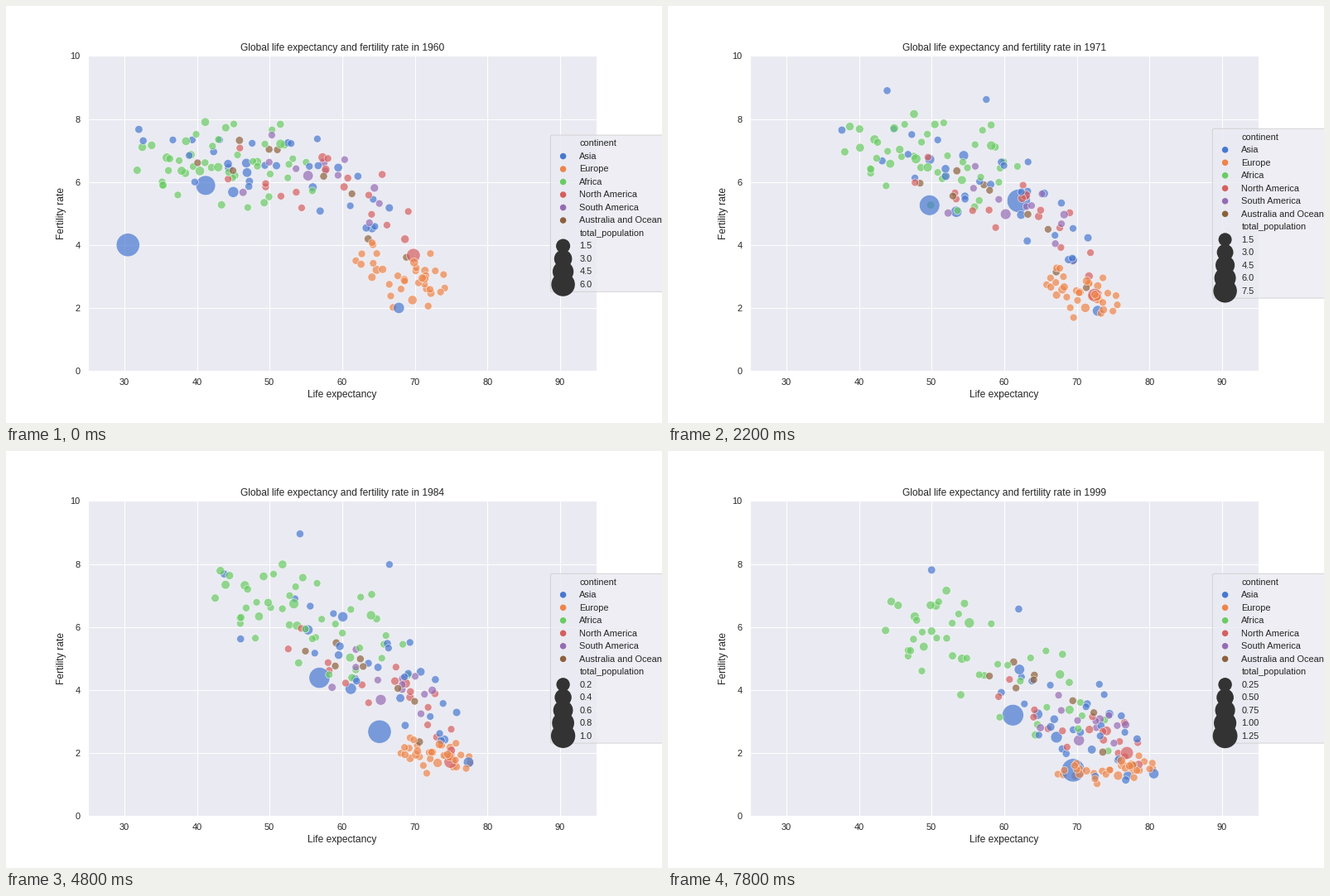
A matplotlib script that plays this animation: 792 px wide and 504 px high, repeating every 8000 ms.

```python
import matplotlib.pyplot as plt
import numpy as np
from matplotlib.animation import FuncAnimation
from matplotlib.patches import FancyBboxPatch

W, H, DPI = 792, 504, 72
FIRST, MID, LAST = 1960, 1981, 1999
INK, PANEL = "0.15", "#EAEAF2"
COLORS = {
    "Asia": "#4878D0",
    "Europe": "#EE854A",
    "Africa": "#6ACC64",
    "North America": "#D65F5F",
    "South America": "#956CB4",
    "Australia and Oceania": "#8C613C",
}
rng = np.random.default_rng(12)
dots = []  # (draw order, colour, place(year), population(year) in 1e8)


def progress(year):
    return (year - FIRST) / (LAST - FIRST)


def blend(year):
    """Weights of a parabola through the first, middle and last year."""
    a, b, c = FIRST, MID, LAST
    return np.array([(year - b) * (year - c) / ((a - b) * (a - c)),
                     (year - a) * (year - c) / ((b - a) * (b - c)),
                     (year - a) * (year - b) / ((c - a) * (c - b))])


def growth(pop, rate):
    return lambda year: pop * (1 + rate * progress(year))


def add(name, continent, place, pop):
    order = (ord(name[0]) - 65 + (ord(name[1]) - 97) / 26) / 26
    dots.append((order, COLORS[continent], place, pop))


def crowd(continent, count, spread, *bands):
    """Small countries strung along a band from low to high life expectancy.

    Each band holds life and fertility at its low end, middle and high end.
    """
    for rank in (np.arange(count) + 0.5) / count:
        line = [[np.interp(rank, (0, 0.5, 1), side) for side in (b[:3], b[3:])]
                for b in bands]
        off = np.clip(rng.normal(size=2), -2, 2)

        def place(year, line=np.array(line), off=off):
            sd = np.interp(year, (FIRST, LAST), spread)
            return blend(year) @ line + off * (1, sd)

        dots.append((rng.random(), COLORS[continent], place,
                     growth(0.45 * rng.random() ** 5, 0.8)))


def country(name, continent, pop, *stops, rate=1.3):
    """A country passing through three given places."""
    add(name, continent, lambda year: blend(year) @ np.array(stops), growth(pop, rate))


def route(name, continent, pop, *path):
    """A country with sudden turns: (year, life, fertility) points."""
    years, life, fert = np.array(path, float).T
    add(name, continent,
        lambda year: np.array([np.interp(year, years, life),
                               np.interp(year, years, fert)]), pop)


def china_pop(year):
    return np.interp(year, [1960, 1967, 1974, 1982, 1995, 1999],
                     [6.67, 7.45, 9.02, 10.08, 12.05, 12.53])


crowd("Asia", 26, (0.6, 0.8), (36, 54, 67, 6.7, 6.9, 4.9),
      (51, 66, 75, 6.5, 5.2, 3.2), (62, 72, 78, 3.6, 3, 2.3))
crowd("Europe", 36, (0.5, 0.18), (62, 69.5, 73.5, 3.6, 2.6, 2.8),
      (68, 72.5, 76.5, 2.2, 2, 1.75), (67.5, 75.5, 80, 1.35, 1.4, 1.6))
crowd("Africa", 45, (0.75, 0.9), (33, 43.5, 55, 6.5, 6.8, 6.3),
      (43, 53.5, 67, 7.2, 6.6, 5.4), (45, 54, 74, 6.1, 5.6, 2.6))
crowd("North America", 17, (0.7, 0.5), (44, 59, 70, 6.7, 6.2, 4),
      (51, 67.5, 75, 6.1, 4.4, 2), (59, 73, 79, 4.3, 2.6, 1.6))
crowd("South America", 11, (0.6, 0.4), (45, 58, 67, 6.8, 6.5, 4.2),
      (56, 67.5, 72, 5.3, 4.4, 3.2), (64, 73, 77, 3.6, 2.9, 2.2))
crowd("Australia and Oceania", 9, (0.4, 0.4), (39, 51, 71, 6.6, 6.9, 3.6),
      (53, 62, 75, 5.5, 4.8, 2.1), (57.5, 64, 79.5, 4.5, 4.2, 1.7))

country("India", "Asia", 4.5, (41.2, 5.89), (55.5, 4.6), (61.2, 3.2))
country("Indonesia", "Asia", 0.88, (45, 5.68), (59.6, 4.3), (67.2, 2.5))
country("Japan", "Asia", 0.93, (67.8, 2), (76.5, 1.76), (80.6, 1.34), rate=0.36)
country("Pakistan", "Asia", 0.45, (46.8, 6.6), (59.1, 6.52), (62.1, 4.65), rate=2)
country("Bangladesh", "Asia", 0.48, (46.9, 6.3), (53.8, 6.22), (64.6, 3.23), rate=1.7)
country("Afghanistan", "Asia", 0.09, (32, 7.67), (42.4, 7.67), (50, 7.81))
country("Yemen", "Asia", 0.05, (32.6, 7.31), (52.1, 9.12), (62, 6.57))
country("Oman", "Asia", 0.01, (47.6, 7.23), (64.7, 8.35), (73.1, 4.18))
country("Nigeria", "Africa", 0.45, (40.4, 6.35), (52.4, 6.78), (55.2, 6.13), rate=1.7)
country("Egypt", "Africa", 0.27, (48.3, 6.64), (59.5, 5.3), (69, 3.37))
country("Ethiopia", "Africa", 0.22, (38.4, 6.28), (42.9, 7.35), (50.6, 6.68), rate=1.9)
country("United States", "North America", 1.81,
        (69.8, 3.67), (74.4, 1.8), (76.9, 2), rate=0.54)
country("Mexico", "North America", 0.38, (57.3, 6.78), (67.5, 4.52), (74.1, 2.7))
country("Brazil", "South America", 0.72, (55.3, 6.2), (64.2, 3.97), (70.3, 2.4))
route("China", "Asia", china_pop,
      (1960, 30.5, 4), (1961, 41, 3.9), (1963, 52, 7.3), (1967, 56.9, 5.27),
      (1971, 62, 5.4), (1981, 64.2, 2.7), (1988, 66.4, 2.64),
      (1995, 68.5, 1.68), (1999, 69.5, 1.45))
# Leaves the axes for a while in the late seventies
route("Cambodia", "Asia", growth(0.06, 1),
      (1960, 42.3, 6.96), (1971, 43.2, 6.67), (1975, 20, 5.6), (1978, 20, 5.4),
      (1981, 38, 5.86), (1988, 56.7, 5.3), (1999, 59.6, 3.92))

dots.sort(key=lambda d: d[0])

plt.rcParams.update({
    "font.family": "Liberation Sans", "text.color": INK,
    "axes.labelcolor": INK, "xtick.color": INK, "ytick.color": INK,
})
fig = plt.figure(figsize=(W / DPI, H / DPI), dpi=DPI, facecolor="white")
fig.subplots_adjust(left=0.125, right=0.9, bottom=0.125, top=0.88)

ax = fig.add_subplot(facecolor=PANEL)
ax.set(xlim=(25, 95), ylim=(0, 10), xticks=range(30, 91, 10), yticks=range(0, 11, 2))
ax.set_axisbelow(True)
ax.grid(color="white", lw=1)
ax.tick_params(length=0, pad=9.5, labelsize=11)
for spine in ax.spines.values():
    spine.set(color="white", linewidth=1.25)
ax.set_xlabel("Life expectancy", fontsize=12)
ax.set_ylabel("Fertility rate", fontsize=12)
title = ax.set_title("", fontsize=12)
cloud = ax.scatter([0] * len(dots), [0] * len(dots), s=80, c=[d[1] for d in dots],
                   alpha=0.7, edgecolors="white", linewidths=0.72)

# Legend, laid out in stage pixels
ROW, LEFT, MIDDLE, WIDE = 15.5, 657.4, 250.7, 148
key = fig.add_axes([0, 0, 1, 1])
key.set(xlim=(0, W), ylim=(H, 0))
key.axis("off")
box = key.add_patch(FancyBboxPatch((LEFT, MIDDLE), WIDE, ROW,
                                   boxstyle="round,pad=0,rounding_size=2.2",
                                   fc=PANEL, ec="0.8", lw=1, alpha=0.8))
marks = key.scatter([], [], linewidths=1.5)
labels = [key.text(LEFT + 35, 0, "", fontsize=11, va="baseline") for _ in range(13)]


def size_of(pop, top):
    return 80 + 720 * pop / top


def size_ticks(top):
    step = 1.5 if top <= 9 else 2 if top <= 12 else 2.5
    ticks = np.arange(step, top, step)
    if top >= 10:
        return ticks, [f"{v / 10:.{1 if step == 2 else 2}f}" for v in ticks]
    return ticks, [f"{v:.0f}" if step == 2 else f"{v:.1f}" for v in ticks]


def draw_legend(top):
    ticks, names = size_ticks(top)
    rows = ["continent", *COLORS, "total_population", *names]
    height = len(rows) * ROW + 3.3
    head = MIDDLE - height / 2
    box.set_bounds(LEFT, head, WIDE, height)
    mid = head + 9.3 + ROW * np.arange(len(rows))
    for i, label in enumerate(labels):
        label.set_text(rows[i] if i < len(rows) else "")
        if i < len(rows):
            label.set_y(mid[i] + 4)
    ys = np.delete(mid, [0, 7]) + 0.7
    marks.set_offsets(np.column_stack([np.full(len(ys), LEFT + 15.2), ys]))
    marks.set_sizes([36] * 6 + list(size_of(ticks, top)))
    marks.set_color(list(COLORS.values()) + ["0.2"] * len(ticks))


def draw(i):
    year = FIRST + i
    top = china_pop(year)
    title.set_text(f"Global life expectancy and fertility rate in {year}")
    cloud.set_offsets([place(year) for _, _, place, _ in dots])
    cloud.set_sizes([size_of(pop(year), top) for *_, pop in dots])
    draw_legend(top)
    return cloud, title, marks, box, *labels


anim = FuncAnimation(fig, draw, frames=LAST - FIRST + 1, interval=200,
                     repeat=True, repeat_delay=0, blit=False)
plt.show()
```
